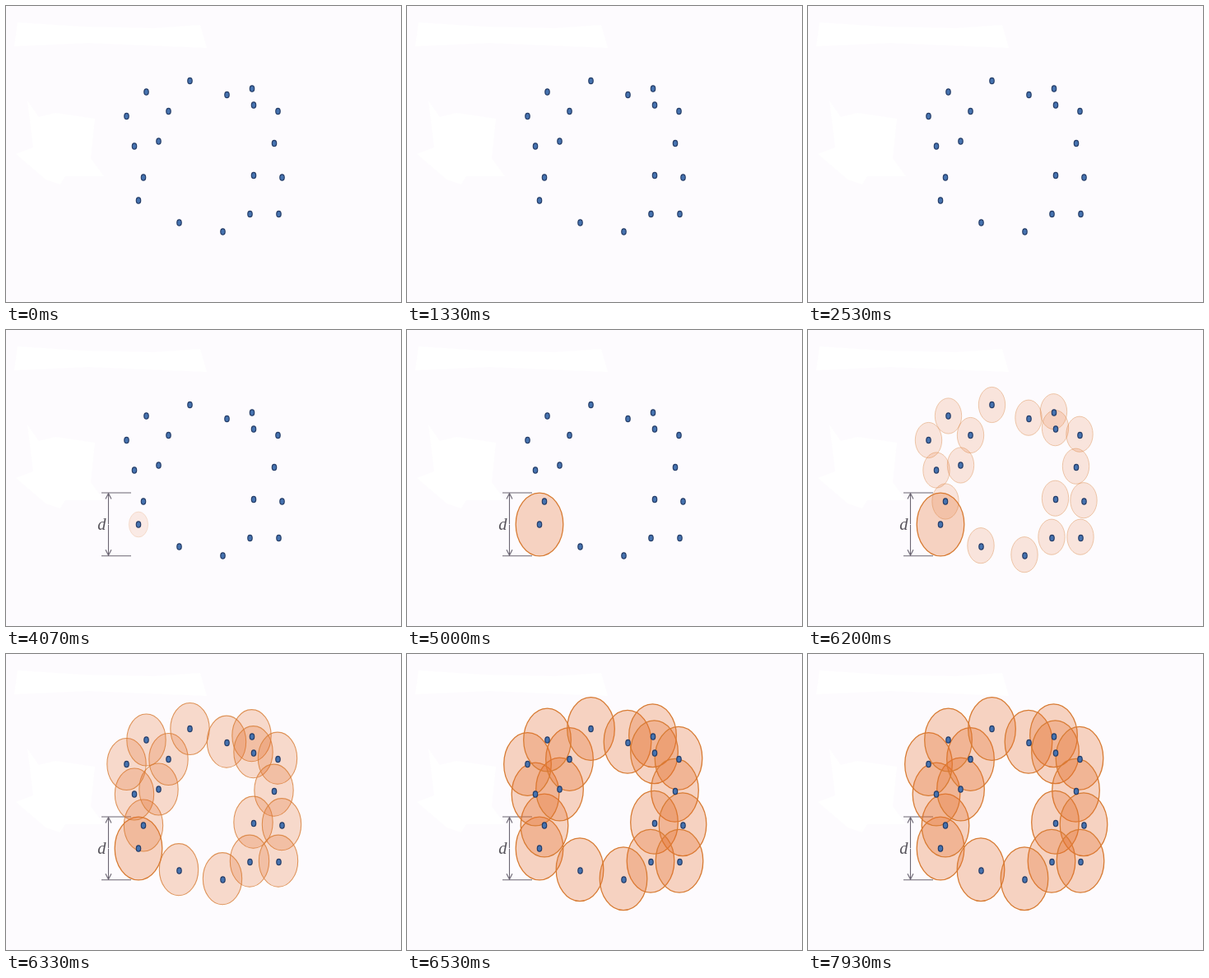
An HTML page that plays this animation: 480 px wide and 360 px high, repeating every 8000 ms.

```html
<!DOCTYPE html>
<html lang="en">
<head>
<meta charset="utf-8">
<title>Growing discs</title>
<style>
  html, body { margin: 0; width: 100%; height: 100%; overflow: hidden; background: #fdfbfe; }
  svg { display: block; width: 100vw; height: 100vh; }
  .disc { fill: #e4702c; fill-opacity: .29; stroke: #d87c34; stroke-width: 1.3; }
  .dot { fill: #4673b0; stroke: #253d68; stroke-width: 1.2; }
  .ruler { fill: none; stroke: #6b6572; stroke-width: 1.1; }
  .label { font: italic 20.5px "Liberation Serif", serif; fill: #56535b; }
</style>
</head>
<body>
<svg viewBox="0 0 480 360">
  <defs>
    <ellipse id="disc" class="disc" rx="28.8" ry="38.4"/>
    <ellipse id="dot" class="dot" rx="2.7" ry="3.7"/>
    <path id="arm" class="ruler" d="M-8.5 0H27.5M0 38V.7M-3.5 7.5L0 .7 3.5 7.5"/>
  </defs>
  <g fill="#fff">
    <path d="M14 20L92 25 180 27 236 23 244 51 100 45 10 49Z"/>
    <path d="M26 115L40 135 60 130 108 137 103 185 119 207 72 207 66 217 48 211 12 180 33 172Z"/>
  </g>
  <g id="ruler">
    <use href="#arm" x="124.5" y="198"/>
    <use href="#arm" transform="translate(124.5 274.7) scale(1 -1)"/>
    <text class="label" x="111.3" y="243.3">d</text>
  </g>
  <g id="discs"></g>
  <g id="dots"></g>
</svg>
<script>
const LOOP = 8000;
const GROW = 500;
const START = { ruler: 2640, first: 3870, rest: 5920 };

const leftArc = [
  [161, 236.5], [167, 208.5], [156, 170.5], [185.5, 164.5],
  [146.5, 134], [197.5, 128], [170.5, 104.5], [223.5, 91]
];
const rightArc = [
  [268.5, 108], [299, 100.5], [301, 120.5], [330.5, 128], [326, 167], [301, 206],
  [335.5, 208.5], [296.5, 253], [331.5, 253], [210.5, 263.5], [263.5, 274.5]
];

const get = id => document.getElementById(id);
const progress = (t, start) => Math.min(1, Math.max(0, (t - start) / GROW));

function stamp(shape, layer) {
  const node = document.createElementNS("http://www.w3.org/2000/svg", "use");
  node.setAttribute("href", shape);
  return get(layer).appendChild(node);
}

function place(node, x, y, scale = 1) {
  node.setAttribute("transform", `translate(${x} ${y}) scale(${scale})`);
  node.setAttribute("opacity", scale);
}

// The discs of an arc may sit slightly off their dots.
function buildArc(points, dx, dy) {
  return points.map(([x, y]) => {
    place(stamp("#dot", "dots"), x, y);
    return { node: stamp("#disc", "discs"), x: x + dx, y: y + dy };
  });
}

const discs = [...buildArc(leftArc, 0, 0), ...buildArc(rightArc, -0.5, -1.3)];

function render(t) {
  get("ruler").setAttribute("opacity", progress(t, START.ruler));
  discs.forEach(({ node, x, y }, i) =>
    place(node, x, y, progress(t, i ? START.rest : START.first)));
}

const origin = performance.now();
function tick() {
  render((performance.now() - origin) % LOOP);
  requestAnimationFrame(tick);
}
tick();
</script>
</body>
</html>
```
